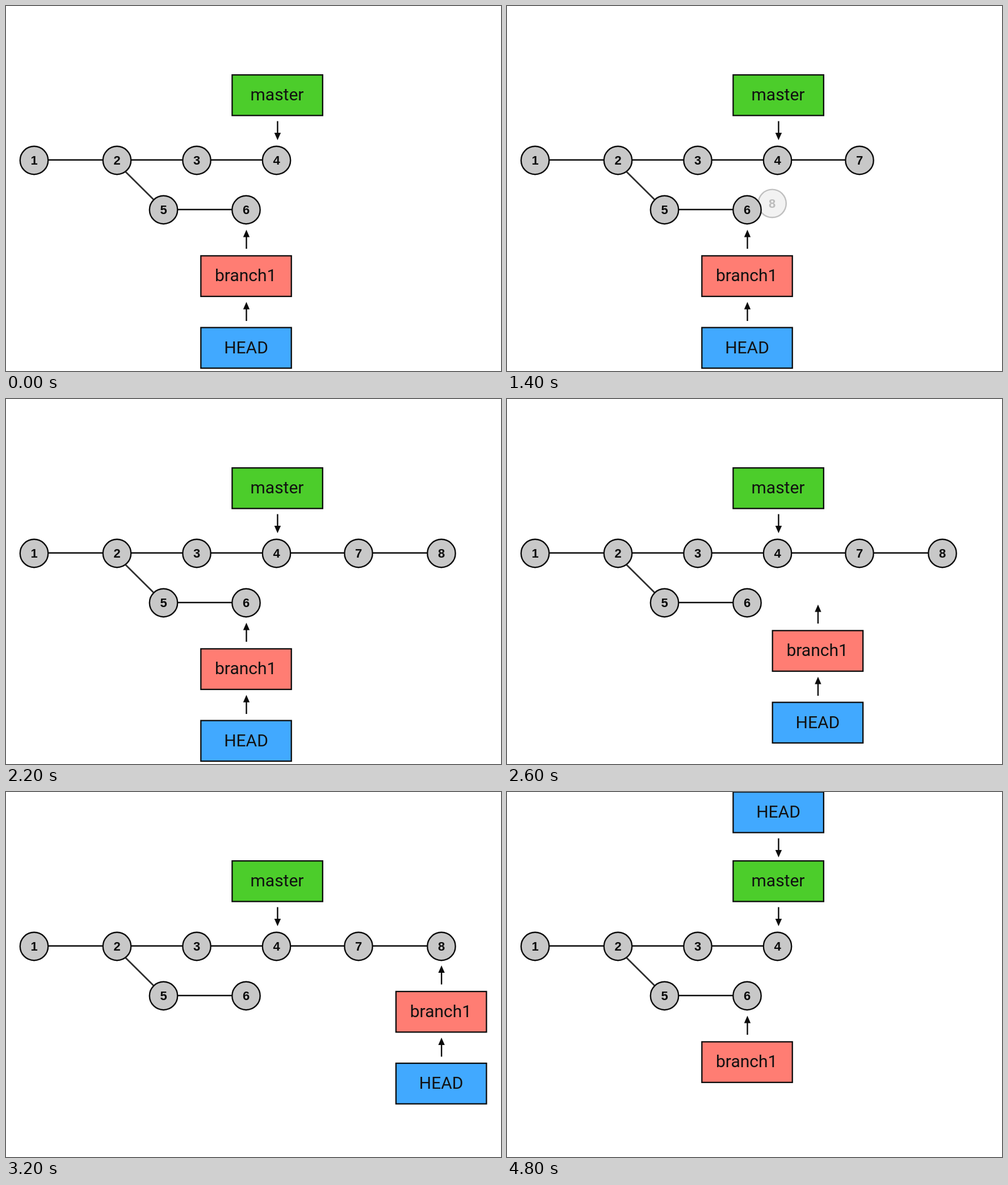
These frames come from a looping animation (872 by 642 pixels, 5 s). An HTML page with a canvas:

```html
<!DOCTYPE html>
<html lang="en">
<head>
<meta charset="utf-8">
<title>Git rebase</title>
<style>
  html, body { margin: 0; width: 100%; height: 100%; overflow: hidden; background: #fff; }
  canvas { display: block; }
</style>
</head>
<body>
<canvas id="stage" width="872" height="642"></canvas>
<script>
const ctx = document.getElementById('stage').getContext('2d');
const LOOP = 5000, STEP = 200, RESET = 4400;
const INK = '#0b0b0b';
const TOP = 271.5, LOW = 358.5;
const RED = '#ff7d73', BLUE = '#41a9ff', GREEN = '#4ccd2b';

const nodes = [[1, 49.5, TOP], [2, 195.5, TOP], [3, 336, TOP], [4, 476.5, TOP],
               [5, 277.5, LOW], [6, 423, LOW]];

// Commits replayed from the lower row onto the upper one
const copies = [
  { label: 7, from: [277.5, LOW], to: [621, TOP], start: 15, span: 840, link: [850, 1000] },
  { label: 8, from: [423, LOW], to: [767, TOP], start: 1190, span: 900, link: [2040, 2180] }
];
const shift = { start: 2217, span: 932, dx: 343.7, dy: -88.5 };

const clamp = v => Math.max(0, Math.min(1, v));
const ease = u => (1 - Math.cos(Math.PI * u)) / 2;
const progress = (t, start, span) => clamp((t - start) / span);
const mix = (a, b, k) => a + (b - a) * k;

function line(x1, y1, x2, y2, color = INK, width = 2.5) {
  ctx.strokeStyle = color;
  ctx.lineWidth = width;
  ctx.beginPath();
  ctx.moveTo(x1, y1);
  ctx.lineTo(x2, y2);
  ctx.stroke();
}

function node(label, x, y) {
  ctx.beginPath();
  ctx.arc(x, y, 24.7, 0, Math.PI * 2);
  ctx.fillStyle = '#c8c8c8';
  ctx.fill();
  ctx.strokeStyle = INK;
  ctx.lineWidth = 2.4;
  ctx.stroke();
  ctx.fillStyle = INK;
  ctx.font = 'bold 22px "Liberation Sans", Arial, sans-serif';
  ctx.fillText(label, x, y + 7.8);
}

function box(label, x, y, color, textX, baseline) {
  ctx.fillStyle = color;
  ctx.fillRect(x, y, 159.4, 71.4);
  ctx.strokeStyle = INK;
  ctx.lineWidth = 2.3;
  ctx.strokeRect(x, y, 159.4, 71.4);
  ctx.fillStyle = '#111';
  ctx.font = '30px Roboto, sans-serif';
  ctx.fillText(label, textX, baseline);
}

// dir: 1 points down, -1 points up
function arrow(x, tip, dir) {
  line(x, tip - dir * 33.5, x, tip - dir * 11, INK, 2.4);
  ctx.fillStyle = INK;
  ctx.beginPath();
  ctx.moveTo(x, tip);
  ctx.lineTo(x - 5.7, tip - dir * 13);
  ctx.lineTo(x + 5.7, tip - dir * 13);
  ctx.fill();
}

function drawCopy(c, t) {
  const u = progress(t, c.start, c.span);
  if (u === 0) return;
  const k = ease(u);
  ctx.globalAlpha = progress(t, c.link[0], c.link[1] - c.link[0]);
  line(c.to[0] - 121, 270.8, c.to[0] - 24, 270.8);
  ctx.globalAlpha = u;
  node(c.label, mix(c.from[0], c.to[0], k), mix(c.from[1], c.to[1], k));
  ctx.globalAlpha = 1;
}

function drawTree() {
  for (const [a, b] of [[74, 171], [220, 312], [360, 452]]) line(a, 270.8, b, 270.8);
  line(302, 358, 398, 358);
  line(210, 291, 260, 340.5, '#303030', 2.8);
  for (const n of nodes) node(...n);
}

function drawLabels(t) {
  const reset = t >= RESET;
  box('master', 398.4, 121.2, GREEN, 477.5, 166.2);
  arrow(478.4, 236, 1);
  if (reset) {
    box('HEAD', 398.4, 0, BLUE, 478, 45.2);
    arrow(478.4, 115, 1);
  }
  const k = reset ? 0 : ease(progress(t, shift.start, shift.span));
  ctx.save();
  ctx.translate(shift.dx * k, shift.dy * k);
  arrow(423.5, 393.5, -1);
  box('branch1', 343.3, 439.4, RED, 422.2, 484.4);
  if (!reset) {
    arrow(423.5, 520.5, -1);
    box('HEAD', 343.3, 565.6, BLUE, 423, 610.8);
  }
  ctx.restore();
}

function draw(t) {
  ctx.fillStyle = '#fff';
  ctx.fillRect(0, 0, 872, 642);
  ctx.textAlign = 'center';
  if (t < RESET) for (const c of [...copies].reverse()) drawCopy(c, t);
  drawTree();
  drawLabels(t);
}

const begin = performance.now();
function tick() {
  const t = (performance.now() - begin) % LOOP;
  draw(Math.floor(t / STEP) * STEP);
  requestAnimationFrame(tick);
}
tick();
</script>
</body>
</html>
```
